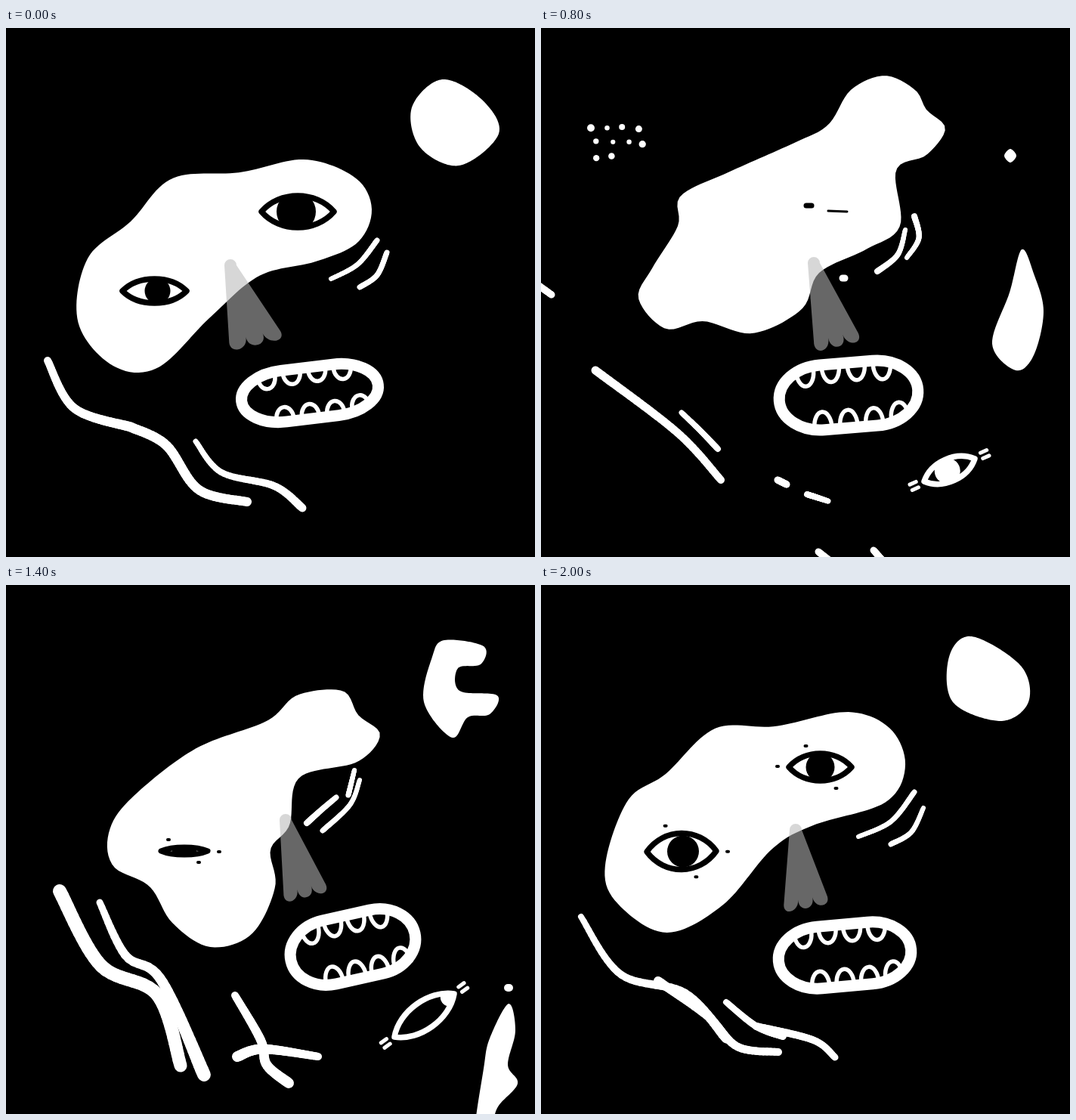
An HTML page with a canvas that plays this animation: 700 px wide and 700 px high, repeating every 2100 ms.

```html
<!DOCTYPE html>
<html>
<head>
<meta charset="utf-8">
<style>
html, body { margin: 0; height: 100%; overflow: hidden; background: #000; }
canvas { display: block; }
</style>
</head>
<body>
<canvas id="stage" width="700" height="700"></canvas>
<script>
const c = document.getElementById('stage').getContext('2d');
const STEP = 100, STEPS = 21;
const tracks = {}, marks = [];
const mix = (a, b, k) => a + (b - a) * k;

// Smooth curve through a few points, resampled to n evenly spaced points.
function resample(flat, closed, n) {
  const m = flat.length / 2, dense = [];
  const pt = i => {
    i = closed ? (i + m) % m : Math.max(0, Math.min(m - 1, i));
    return [flat[2 * i], flat[2 * i + 1]];
  };
  for (let i = 0; i < (closed ? m : m - 1); i++) {
    const [a, b, d, e] = [pt(i - 1), pt(i), pt(i + 1), pt(i + 2)];
    for (let j = 0; j <= 12; j++) {
      const u = j / 12;
      dense.push([0, 1].map(k => b[k] + u / 2 * (d[k] - a[k] +
        u * (2 * a[k] - 5 * b[k] + 4 * d[k] - e[k] + u * (3 * (b[k] - d[k]) + e[k] - a[k])))));
    }
  }
  const len = [0];
  for (let i = 1; i < dense.length; i++)
    len.push(len[i - 1] + Math.hypot(dense[i][0] - dense[i - 1][0], dense[i][1] - dense[i - 1][1]));
  const out = [];
  for (let i = 0, j = 1; i < n; i++) {
    const s = len.at(-1) * i / (closed ? n : n - 1);
    while (j < len.length - 1 && len[j] < s) j++;
    const k = (s - len[j - 1]) / (len[j] - len[j - 1] || 1);
    out.push(mix(dense[j - 1][0], dense[j][0], k), mix(dense[j - 1][1], dense[j][1], k));
  }
  return out;
}

// Keyed poses: a track is visible from its first key to its last.
const put = (name, t, ...v) => (tracks[name] ??= []).push([t, v]);
const blob = (name, t, ...p) => put(name, t, ...resample(p, true, 180));
const line = (name, t, w0, w1, ...p) => put(name, t, w0, w1, ...resample(p, false, 40));
const mark = (t, color, ...list) => marks.push({ t, color, list });

function pose(name, t) {
  const keys = tracks[name], i = keys.findLastIndex(k => k[0] <= t);
  if (i < 0) return;
  const [t0, a] = keys[i];
  if (t === t0) return a;
  if (i + 1 === keys.length) return;
  const [t1, b] = keys[i + 1];
  return a.map((v, j) => mix(v, b[j], (t - t0) / (t1 - t0)));
}

blob('face', 0, 165,256, 220,199, 310,191, 395,174, 462,198, 484,240, 465,284, 410,309, 335,328, 270,383, 200,450, 140,446, 95,388, 108,305);
blob('face', 3, 165,253, 235,183, 340,182, 385,147, 432,128, 467,155, 472,195, 484,245, 460,280, 385,312, 315,345, 270,398, 220,433, 160,438, 105,402, 87,345, 115,275);
blob('face', 8, 181,262, 185,222, 250,190, 335,152, 380,128, 410,82, 455,63, 495,82, 510,108, 535,133, 510,168, 470,188, 475,262, 430,293, 368,324, 345,372, 280,404, 215,388, 165,398, 129,358, 147,318);
blob('face', 11, 190,272, 215,215, 300,165, 345,125, 370,70, 410,51, 462,73, 468,115, 444,146, 490,170, 494,205, 440,245, 425,288, 375,313, 379,395, 345,435, 262,460, 225,430, 215,390, 150,390, 122,355, 145,313);
blob('face', 14, 165,283, 250,217, 345,180, 385,146, 445,140, 466,172, 495,198, 465,234, 388,255, 375,318, 350,350, 356,400, 325,462, 270,479, 220,447, 190,399, 142,372, 136,328);
blob('face', 16, 150,248, 215,203, 300,187, 365,156, 425,151, 475,163, 497,215, 470,263, 385,312, 280,358, 258,405, 225,470, 165,468, 118,410, 83,365, 100,300);
blob('face', 20, 165,250, 230,190, 310,187, 405,168, 462,190, 482,240, 455,288, 360,318, 305,350, 240,424, 165,460, 100,420, 85,370, 115,285);

// The old moon drips away while a new one grows.
blob('drop', 0, 577,68, 630,95, 652,140, 600,182, 548,158, 537,105);
blob('drop', 3, 600,126, 645,135, 673,195, 655,255, 632,283, 613,265, 606,205, 574,155);
blob('drop', 8, 636,293, 652,325, 665,375, 652,433, 628,453, 597,418, 620,350);
blob('drop', 11, 644,403, 660,435, 694,530, 662,591, 642,555, 645,495, 627,425);
blob('drop', 14, 665,554, 674,590, 664,635, 677,660, 650,692, 640,730, 620,730, 632,640, 640,600);
blob('drop', 16, 628,668, 650,690, 652,730, 620,730);
blob('moon', 7, 621,166, 624,169, 621,172, 618,169);
blob('moon', 8, 621,160, 629,169, 621,178, 613,169);
blob('moon', 11, 608,104, 641,138, 630,180, 596,180, 594,150, 585,122);
blob('moon', 14, 580,73, 632,81, 628,105, 598,110, 600,140, 650,146, 640,171, 611,175, 590,202, 553,155, 564,95);
blob('moon', 16, 570,75, 600,92, 618,114, 575,107, 566,122, 635,132, 640,170, 595,180, 545,150, 540,95);
blob('moon', 20, 570,68, 635,107, 645,155, 608,180, 545,155, 540,95);

// Nose: tip, then the left and right ends of its base.
put('nose', 0, 297,314, 295,424, 368,407);
put('nose', 3, 345,319, 355,422, 412,394);
put('nose', 8, 361,311, 361,425, 424,410);
put('nose', 11, 385,312, 393,419, 448,400);
put('nose', 14, 370,311, 367,417, 427,402);
put('nose', 16, 362,312, 371,413, 430,386);
put('nose', 20, 337,324, 320,430, 382,418);

// Mouth: centre, half width, half height, tilt.
put('mouth', 0, 402,483, 91,34, -.12);
put('mouth', 3, 404,489, 87,46, -.04);
put('mouth', 8, 407,486, 92,43, -.08);
put('mouth', 11, 441,487, 80,41, -.12);
put('mouth', 14, 459,479, 84,43, -.22);
put('mouth', 16, 400,487, 80,44, -.06);
put('mouth', 20, 402,490, 88,41, -.09);

// Eyes: both corners, half height, pupil offset and radius.
put('eyeR', 0, 338,243, 434,243, 21, -2, 26);
put('eyeR', 3, 335,237, 441,237, 16, 0, 20);
put('eyeR', 7, 352,239, 415,241, 0, 0, 3);
put('eyeL', 0, 154,348, 239,348, 16, 4, 17);
put('eyeL', 3, 197,302, 301,296, 9, 2, 20);
put('eyeL', 6, 235,290, 280,288, 0, 0, 3);
put('newR', 17, 395,243, 345,243, 1, 0, 5);
put('newR', 20, 411,241, 328,241, 18, 0, 19);
put('newL', 13, 215,352, 260,352, 0, 0, 3);
put('newL', 14, 205,352, 267,352, 5, 0, 16);
put('newL', 16, 130,375, 212,373, 15, 4, 18);
put('newL', 20, 140,353, 232,352, 24, 2, 21);
put('loose', 6, 525,592, 555,578, 1, 0, 3);
put('loose', 8, 507,600, 574,570, 15, -3, 17);
put('loose', 11, 512,607, 586,549, 15, 17, 17);
put('loose', 14, 514,598, 593,541, 18, 41, 12);
put('loose', 16, 516,597, 597,543, 4, 20, 0);

// Neck lines: end widths, then points.
line('neck1', 0, 10,13, 55,440, 90,503, 165,528);
line('neck1', 3, 9,13, 16,372, 60,435, 131,510);
line('neck1', 8, 9,9, -25,325, 14,353);
line('neck2', 0, 13,12, 165,528, 212,552, 255,611, 319,627);
line('neck2', 3, 10,11, 206,550, 265,630, 346,667);
line('neck2', 8, 9,9, 367,693, 395,715);
line('neck3', 0, 7,11, 251,547, 285,588, 355,606, 392,635);
line('neck3', 3, 10,12, 282,572, 370,605, 421,662);
line('neck3', 8, 9,9, 440,691, 470,725);
line('arm1', 4, 3,3, 60,445, 68,450);
line('arm1', 8, 11,10, 72,453, 180,535, 238,598);
line('arm1', 11, 9,28, 77,435, 112,500, 175,534, 228,612);
line('arm1', 14, 18,17, 71,405, 125,503, 200,542, 231,636);
line('arm1', 16, 18,24, 55,404, 110,472, 200,525, 260,610);
line('arm1', 20, 8,13, 53,439, 105,515, 190,540, 245,600);
line('arm2', 2, 5,5, 145,535, 165,540);
line('arm2', 3, 7,9, 132,541, 160,548, 185,567);
line('arm2', 8, 7,8, 186,509, 210,532, 234,557);
line('arm2', 11, 10,29, 141,473, 213,518, 250,573);
line('arm2', 14, 9,18, 124,420, 158,490, 205,522, 262,648);
line('arm2', 16, 24,10, 95,460, 200,525, 255,608, 291,627);
line('arm2', 20, 12,10, 155,524, 220,570, 260,611, 314,618);
line('bone1', 7, 5,5, 307,594, 313,598);
line('bone1', 8, 9,9, 313,598, 325,604);
line('bone1', 11, 48,40, 309,569, 340,605, 390,622);
line('bone1', 14, 10,14, 303,543, 337,602, 345,635, 374,659);
line('bone1', 16, 10,14, 270,545, 305,585, 378,627);
line('bone1', 20, 8,10, 245,552, 285,584, 320,597);
line('bone2', 7, 4,4, 347,615, 357,619);
line('bone2', 8, 8,7, 352,617, 380,626);
line('bone2', 11, 36,54, 309,613, 345,618, 397,622);
line('bone2', 14, 14,10, 306,624, 340,614, 413,624);
line('bone2', 16, 13,14, 293,580, 375,615, 422,635);
line('bone2', 20, 10,9, 285,584, 360,602, 389,625);

// Cheek creases
line('cheek1', 0, 6,7, 430,332, 465,313, 491,281);
line('cheek1', 3, 9,8, 375,338, 415,335, 453,319);
line('cheek1', 8, 8,6, 445,322, 472,300, 482,267);
line('cheek1', 11, 6,8, 416,317, 453,300, 464,282);
line('cheek1', 14, 8,7, 398,315, 418,297, 437,281);
line('cheek1', 16, 7,6, 382,335, 397,317, 427,300);
line('cheek1', 20, 6,7, 420,333, 463,313, 494,274);
line('cheek2', 0, 7,7, 468,343, 491,327, 504,297);
line('cheek2', 3, 6,9, 463,338, 497,305, 514,257);
line('cheek2', 8, 6,8, 484,304, 500,278, 494,249);
line('cheek2', 11, 8,9, 433,326, 474,296, 477,242);
line('cheek2', 14, 7,6, 419,325, 455,291, 468,258);
line('cheek2', 16, 8,6, 397,345, 440,318, 463,287);
line('cheek2', 20, 7,6, 463,343, 490,327, 506,295);
line('cheek3', 2, 3,3, 492,280, 497,260);
line('cheek3', 3, 5,6, 488,284, 498,242);
line('cheek3', 5, 2,2, 492,270, 498,250);
line('cheek4', 10, 3,3, 463,250, 464,253);
line('cheek4', 11, 7,6, 463,256, 464,247);
line('cheek4', 14, 7,6, 453,278, 461,245);
line('cheek4', 16, 7,7, 440,287, 457,275);

// Brief dots and dashes: both ends and a width.
mark(3, '#fff', [81,150,82,150,9], [103,146,103,146,11], [464,310,474,305,8]);
mark(8, '#fff', [399,331,402,331,9]);
mark(8, '#000', [351,235,358,235,7], [380,242,405,243,3]);
mark(11, '#fff', [109,153,109,153,6], [89,171,89,171,5], [392,340,406,328,7]);
mark(11, '#000', [221,325,232,324,3], [285,318,286,318,4]);
mark(14, '#fff', [664,533,666,533,10]);
mark(16, '#000', [591,153,592,154,8], [608,155,610,157,8]);

// Swarm of ten dots: loose rows with seeded sizes and offsets.
let seed = 5;
const random = () => (seed = seed * 16807 % 2147483647) / 2147483647;
const swarm = Array.from({ length: 10 }, (_, i) => {
  const x = 66 + i % 4 * 20 + (i > 3 ? 6 : 0) + random() * 5;
  const y = 129 + Math.floor(i / 4) * 20 + random() * 5;
  return [x, y, x, y, 6 + random() * 5];
});
mark(8, '#fff', ...swarm);

function segment(x0, y0, x1, y1, w) {
  c.lineWidth = w;
  c.beginPath();
  c.moveTo(x0, y0);
  c.lineTo(x1 + .01, y1);
  c.stroke();
}

function drawBlob(p) {
  if (!p) return;
  c.fillStyle = '#fff';
  c.beginPath();
  for (let i = 0; i < p.length; i += 2) c.lineTo(p[i], p[i + 1]);
  c.fill();
}

function drawLine(p) {
  if (!p) return;
  const [w0, w1, ...q] = p, last = q.length - 2;
  c.strokeStyle = '#fff';
  for (let i = 0; i < last; i += 2)
    segment(q[i], q[i + 1], q[i + 2], q[i + 3], mix(w0, w1, i / last));
}

function drawEye(name, t, ink, inside) {
  const p = pose(name, t);
  if (!p) return;
  const [x0, y0, x1, y1, h, u, r] = p;
  const a = Math.hypot(x1 - x0, y1 - y0) / 2, k = h * 4 / 3;
  const lid = new Path2D();
  lid.moveTo(-a, 0);
  lid.bezierCurveTo(-a / 2, -k, a / 2, -k, a, 0);
  lid.bezierCurveTo(a / 2, k, -a / 2, k, -a, 0);
  lid.closePath();
  c.save();
  c.translate((x0 + x1) / 2, (y0 + y1) / 2);
  c.rotate(Math.atan2(y1 - y0, x1 - x0));
  c.fillStyle = inside;
  c.fill(lid);
  c.save();
  c.clip(lid);
  c.fillStyle = ink;
  c.beginPath();
  c.arc(u, 0, r, 0, 7);
  c.fill();
  c.restore();
  c.strokeStyle = ink;
  c.lineWidth = Math.min(7.5, 2 + h);
  c.stroke(lid);
  if (name === 'loose') {
    for (const side of [-1, 1]) for (const v of [-4, 4])
      segment(side * (a + 10), v, side * (a + 19), v, 5);
  } else if (name.startsWith('new')) {
    for (const [x, y] of [[-22, -h - 10], [a + 14, 1], [18, h + 10]]) segment(x, y, x + 2, y, 4);
  }
  c.restore();
}

function drawMouth(t) {
  const [x, y, a, b, tilt] = pose('mouth', t);
  c.save();
  c.translate(x, y);
  c.rotate(tilt);
  c.strokeStyle = '#fff';
  c.lineWidth = 15;
  c.beginPath();
  c.roundRect(-a, -b, 2 * a, 2 * b, { x: a * .62, y: b });
  c.stroke();
  c.lineWidth = 5.5;
  for (let i = 0; i < 4; i++) for (const side of [-1, 1]) {
    const u = (side < 0 ? -.6 : -.4) + .37 * i;
    const root = b * (1 - .35 * Math.max(0, Math.abs(u) - .4));
    c.beginPath();
    c.ellipse(u * a, side * (root - 4), 11.5, b * .46, 0, 0, Math.PI, side > 0);
    c.stroke();
  }
  c.restore();
}

function drawNose(t) {
  const [x, y, x0, y0, x1, y1] = pose('nose', t), lobes = 3;
  const base = (k, pull) => [mix(mix(x0, x1, k), x, pull), mix(mix(y0, y1, k), y, pull)];
  c.fillStyle = 'rgba(184,184,184,.56)';
  c.beginPath();
  c.arc(x, y, 8, Math.PI, 0);
  for (let i = lobes; i > 0; i--) {
    c.lineTo(...base(i / lobes, .09));
    c.bezierCurveTo(...base(i / lobes, -.08), ...base((i - 1) / lobes, -.08), ...base((i - 1) / lobes, .09));
  }
  c.fill();
}

function drawMarks(t) {
  for (const m of marks) {
    const d = Math.abs(t - m.t) / 2;
    if (d >= 1) continue;
    c.strokeStyle = m.color;
    for (const [x0, y0, x1, y1, w] of m.list) segment(x0, y0, x1, y1, w * Math.cos(d * Math.PI / 2));
  }
}

function draw(t) {
  c.fillStyle = '#000';
  c.fillRect(0, 0, 700, 700);
  c.lineCap = c.lineJoin = 'round';
  for (const name of ['face', 'drop', 'moon']) drawBlob(pose(name, t));
  for (const name of ['eyeL', 'eyeR', 'newL', 'newR']) drawEye(name, t, '#000', '#fff');
  drawEye('loose', t, '#fff', '#000');
  for (const name in tracks)
    if (/^(neck|arm|bone|cheek)/.test(name)) drawLine(pose(name, t));
  drawMouth(t);
  drawNose(t);
  drawMarks(t);
}

function tick() {
  draw(Math.floor(performance.now() / STEP) % STEPS);
  requestAnimationFrame(tick);
}
tick();
</script>
</body>
</html>
```
